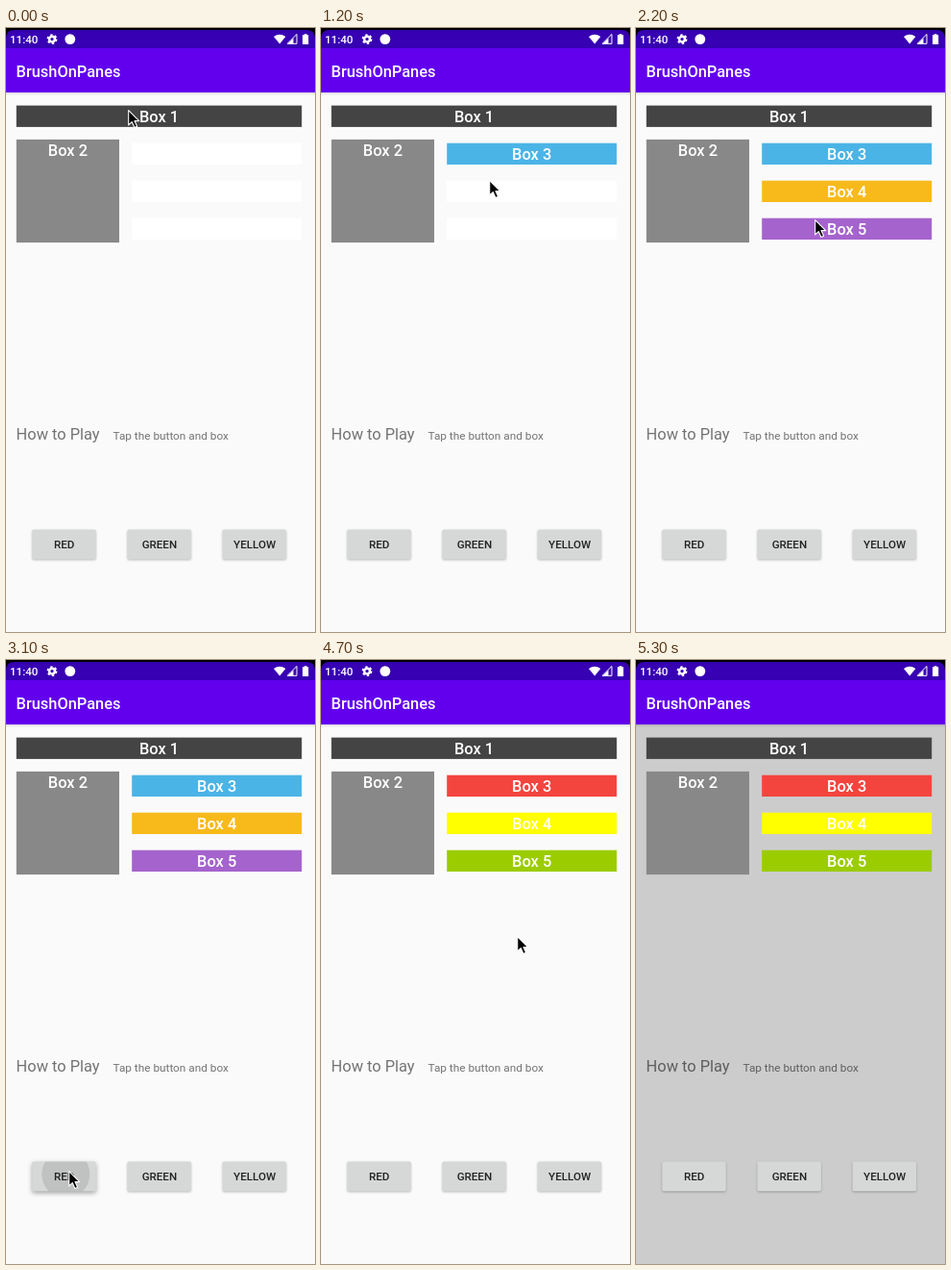
Animation of 322x628 px, one loop 5.9 s. Source, as an HTML page:

```html
<!DOCTYPE html>
<html lang="en">
<head>
<meta charset="utf-8">
<title>BrushOnPanes</title>
<style>
  html, body { margin: 0; width: 100%; height: 100%; overflow: hidden; background: #000; }
  svg { display: block; width: 322px; height: 628px; }
  text { font-family: Roboto, sans-serif; }
  .label { font-size: 16.4px; font-weight: 500; fill: #fff; }
  .mid { text-anchor: middle; }
  .note { fill: #000; fill-opacity: .54; }
  .small { font-size: 11.6px; font-weight: 500; }
  .face { fill: #d6d7d7; filter: drop-shadow(0 1px 1px rgba(0, 0, 0, .25)); }
  .pressed .face { filter: drop-shadow(0 2px 2.5px rgba(0, 0, 0, .36)); }
  .ripple { fill: #000; fill-opacity: .1; visibility: hidden; }
  .pressed .ripple { visibility: visible; }
</style>
</head>
<body>
<svg viewBox="0 0 322 628">
  <defs>
    <linearGradient id="fade" x2="0" y2="1">
      <stop stop-color="#000" stop-opacity=".14"/>
      <stop offset="1" stop-color="#000" stop-opacity="0"/>
    </linearGradient>
  </defs>
  <rect id="page" y="60" width="322" height="568" fill="#fafafa"/>
  <rect y="67" width="322" height="3" fill="url(#fade)"/>
  <path d="M0 22V11Q0 2 9 2H313Q322 2 322 11V22Z" fill="#3700b3"/>
  <rect y="21" width="322" height="46" fill="#6200ee"/>

  <g fill="#fff">
    <text x="4" y="16" class="small">11:40</text>
    <g fill="none" stroke="#fff" stroke-width="2">
      <circle cx="48" cy="11.6" r="2.9" stroke-width="2.4"/>
      <circle cx="48" cy="11.6" r="4.4" stroke-dasharray="2.3 2.3"/>
    </g>
    <circle cx="66.8" cy="11.6" r="5.4"/>
    <path d="M279 9Q285.2 4.4 291.4 9L285.2 16.6Z"/>
    <path d="M293.2 16.3L303 6.5V16.3Z" fill="none" stroke="#fff"/>
    <path d="M293.5 16.5L299.5 10.5V16.5Z"/>
    <path d="M309 7.3H310.7V6.2H313.5V7.3H315.2V17H309Z"/>
  </g>
  <text x="10.6" y="51" class="label">BrushOnPanes</text>

  <g id="boxes"></g>
  <text x="10.6" y="428.2" class="note" font-size="16.4">How to Play</text>
  <text x="111.5" y="427.9" class="note" font-size="11.8">Tap the button and box</text>
  <g id="buttons"></g>

  <path id="pointer" d="M0 0V15.2L3.5 11.9L6.2 17.8L8.9 16.6L6.3 10.9H11Z"
        fill="#000" stroke="#fff" stroke-width="1.1" stroke-linejoin="round"/>
</svg>
<script>
const LOOP = 5900, STEP = 100;
const $ = id => document.getElementById(id);

function add(parent, tag, attrs, text) {
  const el = document.createElementNS('http://www.w3.org/2000/svg', tag);
  for (const key in attrs) el.setAttribute(key, attrs[key]);
  if (text) el.textContent = text;
  return parent.appendChild(el);
}

// Layout: a wide bar, a square below it, and a column of three rows beside it.
const ROW = 22.3, SIDE = 107.2, LEFT = 10.8, RIGHT = 308.2, COLUMN = 131.2;

function box(name, x, y, width, height, fill) {
  const rect = add($('boxes'), 'rect', { x, y, width, height, fill });
  add($('boxes'), 'text', { x: x + width / 2, y: y + 17.5, class: 'label mid' }, name);
  return rect;
}

box('Box 1', LEFT, 80.6, RIGHT - LEFT, ROW, '#444');
box('Box 2', LEFT, 115.9, SIDE, SIDE, '#888');
const [box3, box4, box5] = [0, 1, 2].map(i =>
  box('Box ' + (i + 3), COLUMN, 119.7 + 39 * i, RIGHT - COLUMN, ROW, '#fff'));

const [red, green, yellow] = ['RED', 'GREEN', 'YELLOW'].map((name, i) => {
  const x = 27.3 + 99.2 * i, y = 521.6;
  const shape = { x, y, width: 66.4, height: 30.6, rx: 1.6 };
  const g = add($('buttons'), 'g', {});
  add(add(g, 'clipPath', { id: 'clip' + i }), 'rect', shape);
  add(g, 'rect', { ...shape, class: 'face' });
  add(g, 'circle', { cx: x + 35, cy: y + 13, r: 25, class: 'ripple', 'clip-path': `url(#clip${i})` });
  add(g, 'text', { x: x + 33.4, y: y + 19.7, class: 'small mid', fill: '#222' }, name);
  return g;
});

// The pointer travels from stop to stop and taps as it leaves each one.
const stops = [];
const stop = (x, y, arrive, leave = arrive, el, fill) => stops.push({ x, y, arrive, leave, el, fill });

stop(128, 86, 0);
stop(150, 134, 500, 800, box3, '#4bb4e6');
stop(176, 159, 1200, 1400, box4, '#f8ba1a');
stop(187, 200, 1900, 2200, box5, '#a563cd');
stop(20, 480, 2600);
stop(66, 532, 3100, 3100, red);
stop(165, 125, 3400, 3600, box3, '#f4443e');
stop(158, 535, 3700, 3700, green);
stop(187, 203, 3800, 3800, box5, '#9bcc00');
stop(266, 543, 4000, 4100, yellow);
stop(200, 165, 4400, 4400, box4, '#ff0');
stop(205, 288, 4700, 5000, $('page'), '#ccc');
stop(330, 320, 5300);

// The red tap lands on arrival, before the pause that follows.
const tapTime = s => s.fill === '#f4443e' ? s.arrive : s.leave;
const taps = stops.filter(s => s.el);
const painted = taps.filter(s => s.fill);
const pressed = taps.filter(s => !s.fill);
const base = new Map(painted.map(s => [s.el, s.el.getAttribute('fill')]));

function pointerAt(t) {
  const i = stops.findLastIndex(s => s.arrive <= t);
  const from = stops[i], to = stops[i + 1];
  if (!to || t <= from.leave) return [from.x, from.y];
  const k = (1 - Math.cos(Math.PI * (t - from.leave) / (to.arrive - from.leave))) / 2;
  return [from.x + (to.x - from.x) * k, from.y + (to.y - from.y) * k];
}

function draw(t) {
  const [x, y] = pointerAt(t).map(Math.round);
  $('pointer').setAttribute('transform', `translate(${x - .3} ${y - .3})`);
  base.forEach((fill, el) => {
    const last = painted.findLast(s => s.el === el && tapTime(s) <= t);
    el.setAttribute('fill', last ? last.fill : fill);
  });
  for (const s of pressed) s.el.classList.toggle('pressed', t >= s.leave && t < s.leave + STEP);
}

const start = performance.now();
function tick() {
  const t = (performance.now() - start) % LOOP;
  draw(Math.floor(t / STEP) * STEP);
  requestAnimationFrame(tick);
}
tick();
</script>
</body>
</html>
```
